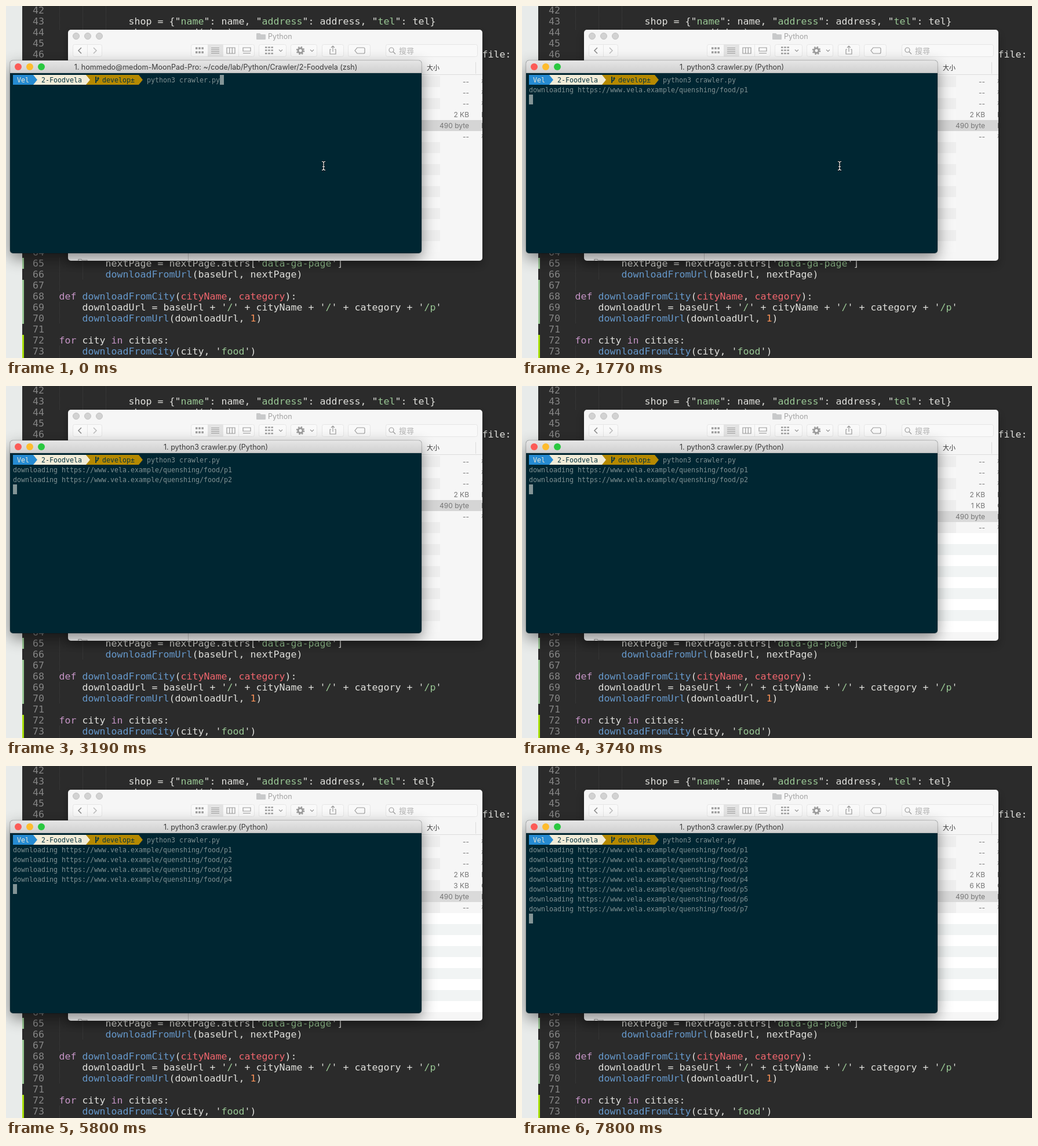
Write an HTML page that moves like this. It is 880x608 px and loops after 8000 ms.

```html
<!DOCTYPE html>
<html lang="en">
<head>
<meta charset="utf-8">
<title>Crawler run</title>
<style>
html, body { margin: 0; width: 100%; height: 100%; overflow: hidden; background: #2b2b2b; }
svg { display: block; width: 880px; height: 608px; }
text { white-space: pre; }
.code { font: 16.61px "DejaVu Sans Mono", monospace; fill: #e0e0dc; }
.term { font: 11.63px "DejaVu Sans Mono", monospace; fill: #7f9092; }
.ui { font-family: Inter, "Noto Sans CJK TC", "Noto Sans CJK", sans-serif; }
.cell { font-size: 12px; fill: #757575; }
.icon { fill: none; stroke: #9b9b9b; stroke-width: 1.2; }
</style>
</head>
<body>
<svg id="stage" viewBox="0 0 880 608" xmlns="http://www.w3.org/2000/svg">
  <defs>
    <linearGradient id="bar" x2="0" y2="1">
      <stop offset="0" stop-color="#e6e6e6"/><stop offset="1" stop-color="#cecece"/>
    </linearGradient>
    <filter id="softShadow" filterUnits="userSpaceOnUse" x="0" y="0" width="880" height="608">
      <feDropShadow dx="0" dy="7" stdDeviation="8" flood-opacity=".3"/>
    </filter>
    <filter id="deepShadow" filterUnits="userSpaceOnUse" x="-60" y="40" width="860" height="470">
      <feDropShadow dx="0" dy="9" stdDeviation="13" flood-opacity=".45"/>
    </filter>
    <clipPath id="listClip"><rect x="717" y="96" width="105" height="329"/></clipPath>
    <path id="beamShape" d="M-3-7.500q3 0 3 2.500v10q0 2.500-3 2.500M3-7.500q-3 0-3 2.500M0 5q0 2.500 3 2.500M-2 1.500h4" fill="none"/>
  </defs>

  <rect width="880" height="608" fill="#2b2b2b"/>
  <rect width="28" height="608" fill="#e8ebea"/>
  <g fill="#99c794">
    <rect x="28" y="435" width="3" height="19"/><rect x="28" y="473" width="3" height="76"/>
  </g>
  <rect x="28" y="568" width="3" height="40" fill="#a8e000"/>
  <path d="M92.5 0V41M132.5 0V41M172.5 0V41M92.5 435V492M132.5 435V473M92.5 511V549M92.5 587V608"
        stroke="#404040" stroke-dasharray="1 1"/>
  <g id="editor" class="code"></g>

  <g class="ui">
    <rect x="107" y="41" width="715" height="399" rx="5" fill="#f6f6f6" filter="url(#softShadow)"/>
    <g fill="#d2d2d2" stroke="#c2c2c2">
      <circle cx="121" cy="52" r="5.5"/><circle cx="141" cy="52" r="5.5"/><circle cx="161" cy="52" r="5.5"/>
    </g>
    <path d="M432 48q0-1 1-1h5l2 2h7q1 0 1 1v7q0 1-1 1h-14q-1 0-1-1z" fill="#c8c9ca"/>
    <text x="452" y="57" font-size="12.5" fill="#a2a2a2">Python</text>
    <g id="buttons" fill="#f9f9f9" stroke="#e6e6e6"></g>
    <path d="M140.5 66V88M374.5 66V88M401.5 66V88" stroke="#e6e6e6"/>
    <rect x="348" y="66" width="26" height="22" fill="#e3e3e3"/>
    <g class="icon">
      <path d="M130 72l-5 5 5 5" stroke="#888" stroke-width="1.5"/>
      <path d="M151 72l5 5-5 5" stroke="#bbb" stroke-width="1.5"/>
      <path d="M327 73h14M327 80h14" stroke-width="3.5" stroke-dasharray="3.5 1.7"/>
      <path d="M354 72.5h14M354 75.5h14M354 78.5h14M354 81.5h14"/>
      <path d="M381 72h14v10h-14zM385.7 72v10M390.3 72v10"/>
      <path d="M409 72h13v6h-13zM409 81.5h13"/>
      <path d="M447 71.5h14M447 76.5h14M447 82h14" stroke-dasharray="3.5 1.7" stroke-width="2.5"/>
      <path d="M471 75.5l3 3 3-3M525 75.5l3 3 3-3"/>
      <circle cx="508" cy="77" r="4" stroke-width="3"/>
      <circle cx="508" cy="77" r="6.3" stroke-width="2" stroke-dasharray="2.5 2.45"/>
      <path d="M561 75h-2v8h10v-8h-2M564 79V69M561 72l3-3 3 3"/>
      <path d="M606 72h11q2 0 2 2v6q0 2-2 2h-11l-4-5z"/>
      <circle cx="665" cy="76" r="4"/><path d="M668 79l4 4"/>
    </g>
    <text x="678" y="82" font-size="13" fill="#b4b4b4">搜尋</text>
    <g clip-path="url(#listClip)">
      <path d="M717 95.5h105M717 118.5h105M810.5 97v20" stroke="#dcdcdc"/>
      <text x="726" y="111" font-size="11" fill="#383838">大小</text>
      <g id="stripes"></g>
      <rect id="selection" x="717" width="105" height="19"/>
      <g id="rows" class="cell"></g>
    </g>
    <path d="M314.5 425V440" stroke="#c8c8c8"/>
    <path d="M125 440v-2.5h5l1 1.5h9v1" class="icon"/>
  </g>

  <rect x="7" y="94" width="710" height="333" rx="5" fill="#002831" filter="url(#deepShadow)"/>
  <path d="M7 116V99q0-5 5-5H712q5 0 5 5V116z" fill="url(#bar)"/>
  <path d="M7 115.5H717" stroke="#b4b4b4"/>
  <rect x="6.75" y="93.75" width="710.5" height="333.5" rx="5" fill="none" stroke="#000" stroke-width=".5" opacity=".4"/>
  <circle cx="21" cy="105" r="6" fill="#fc5b57"/>
  <circle cx="41" cy="105" r="6" fill="#fdbc2e"/>
  <circle cx="61" cy="105" r="6" fill="#2ac840"/>
  <text id="title" class="ui" x="362" y="110" text-anchor="middle" font-size="12.5" fill="#3c3c3c"></text>

  <path d="M138 119h91l7 8.5-7 8.5h-91z" fill="#b58900"/>
  <path d="M47 119h91l7 8.5-7 8.5h-91z" fill="#f1ecd8"/>
  <path d="M12 119h35l7 8.5-7 8.5h-35z" fill="#268bd2"/>
  <path d="M155 122v11M155 130q4-1 4-5" fill="none" stroke="#073642" stroke-width="1.8"/>
  <path d="M156.8 125.5l2.2-3 2.2 3z" fill="#073642"/>
  <g class="term">
    <text x="19" y="132" fill="#eee8d5">Vel</text>
    <text x="61" y="132" fill="#073642">2-Foodvela</text>
    <text x="166" y="132" fill="#073642">develop±</text>
    <text x="243" y="132">python3 crawler.py</text>
    <g id="output"></g>
  </g>
  <rect id="cursor" width="7" height="17" fill="#839496"/>

  <g id="mouse">
    <g id="beam">
      <use href="#beamShape" stroke="#000" stroke-width="2.6"/>
      <use href="#beamShape" stroke="#fff" stroke-width="1.2"/>
    </g>
    <path id="arrow" d="M0 0v15l3.5-3.200 2.200 5 2.300-1-2.200-5h4.700z" stroke="#fff"/>
  </g>
</svg>
<script>
const LOOP = 8000, ROW = 19, LIST_TOP = 121, STEP = 58;
const $ = id => document.getElementById(id);
const show = (el, on) => el.setAttribute('visibility', on ? 'visible' : 'hidden');

function add(parent, tag, attrs, text = '') {
  const el = document.createElementNS('http://www.w3.org/2000/svg', tag);
  for (const key in attrs) el.setAttribute(key, attrs[key]);
  el.textContent = text;
  parent.append(el);
  return el;
}

function stepped(t, begin, steps) {
  const p = Math.max(0, Math.min(1, Math.floor((t - begin) / STEP) / steps));
  return p * p * (3 - 2 * p);
}

// Editor: each segment begins with a colour key
const COLORS = { w: '#e0e0dc', p: '#c594c5', b: '#6699cc', g: '#99c794', r: '#f0666e', o: '#f99157' };
const CODE = {
  43: [12, 'wshop = {"|gname|w": name, "|gaddress|w": address, "|gtel|w": tel}'],
  44: [12, 'wshops.append(shop)'],
  46: [73, 'wfile:'],
  65: [8, "wnextPage = nextPage.attrs['|gdata-ga-page|w']"],
  66: [8, 'bdownloadFromUrl|w(baseUrl, nextPage)'],
  68: [0, 'pdef |bdownloadFromCity|w(|rcityName|w, |rcategory|w):'],
  69: [4, "wdownloadUrl = baseUrl + '|g/|w' + cityName + '|g/|w' + category + '|g/p|w'"],
  70: [4, 'bdownloadFromUrl|w(downloadUrl, |o1|w)'],
  72: [0, 'pfor |wcity |pin |wcities:'],
  73: [4, "bdownloadFromCity|w(city, '|gfood|w')"]
};
for (let n = 42; n <= 73; n++) {
  const y = 32 + ROW * (n - 43);
  add($('editor'), 'text', { x: 46, y, fill: '#858585' }, n);
  if (!CODE[n]) continue;
  const [indent, source] = CODE[n];
  const line = add($('editor'), 'text', { x: 91.5 + indent * 10, y });
  for (const part of source.split('|'))
    add(line, 'tspan', { fill: COLORS[part[0]] }, part.slice(1));
}

// File window
for (const [x, w] of [[115, 51], [319, 110], [436, 48], [491, 46], [545, 38], [590, 39], [655, 159]])
  add($('buttons'), 'rect', { x: x + .5, y: 66.5, width: w - 1, height: 21, rx: 3 });

const stripes = Array.from({ length: 16 }, (_, i) =>
  add($('stripes'), 'rect', { x: 717, y: LIST_TOP + ROW * i, height: ROW }));

const rows = [['--', '檔'], ['--', '檔'], ['--', '檔'], ['2 KB', 'P'], ['1 KB', 'C'], ['490 byte', 'P'], ['--', '檔']]
  .map(([size, kind]) => {
    const g = add($('rows'), 'g', {});
    const label = add(g, 'text', { x: 799, y: 14, 'text-anchor': 'end' }, size);
    add(g, 'text', { x: 820, y: 14 }, kind);
    return { g, label };
  });

// Terminal
const PRINT_TIMES = [1530, 3190, 4840, 5800, 6370, 7020, 7620];
const SIZES = [[0, 1], [4840, 2], [5800, 3], [6780, 4], [7800, 6]];
const TITLES = [
  '1. hommedo@medom-MoonPad-Pro: ~/code/lab/Python/Crawler/2-Foodvela (zsh)',
  '1. python3 crawler.py (Python)'
];
const output = PRINT_TIMES.map((_, i) => add($('output'), 'text', { x: 12, y: 149 + 17 * i },
  `downloading https://www.vela.example/quenshing/food/p${i + 1}`));

function renderTerminal(t) {
  $('title').textContent = TITLES[t < 1290 ? 0 : 1];
  const printed = PRINT_TIMES.filter(at => t >= at).length;
  output.forEach((el, i) => show(el, i < printed));
  $('cursor').setAttribute('x', t < 1230 ? 369 : 12);
  $('cursor').setAttribute('y', 119 + 17 * (t < 1230 ? 0 : printed + 1));
}

function renderFiles(t) {
  const p = stepped(t, 3190, 5), inserted = p === 1;
  rows.forEach(({ g }, i) => {
    const index = i > 4 ? i - 1 + p : i;
    g.setAttribute('transform', `translate(0 ${LIST_TOP + ROW * index})`);
  });
  rows[4].g.setAttribute('opacity', p);
  rows[4].label.textContent = SIZES.filter(([at]) => t >= at).pop()[1] + ' KB';
  $('selection').setAttribute('y', LIST_TOP + ROW * (4 + p));
  $('selection').setAttribute('fill', inserted ? '#dadada' : '#d5d5d5');

  stripes.forEach((el, i) => {
    const fresh = inserted && i > 6;
    const dark = fresh ? '#f1f4f4' : '#eeeeee';
    const light = fresh ? '#ffffff' : '#f7f7f7';
    el.setAttribute('width', fresh ? 105 : 32);
    el.setAttribute('fill', i % 2 ? light : dark);
  });
}

// The pointer curves out of the right edge and becomes an arrow past the terminal
function renderMouse(t) {
  const p = stepped(t, 1770, 10);
  const along = (a, b, c) => a * (1 - p) ** 2 + 2 * b * p * (1 - p) + c * p * p;
  const x = along(548, 700, 885), y = along(276, 372, 392);
  $('mouse').setAttribute('transform', `translate(${x} ${y})`);
  show($('beam'), x < 717);
  show($('arrow'), x >= 717);
}

const start = performance.now();
function tick() {
  const t = (performance.now() - start) % LOOP;
  renderTerminal(t);
  renderFiles(t);
  renderMouse(t);
  requestAnimationFrame(tick);
}
tick();
</script>
</body>
</html>
```
